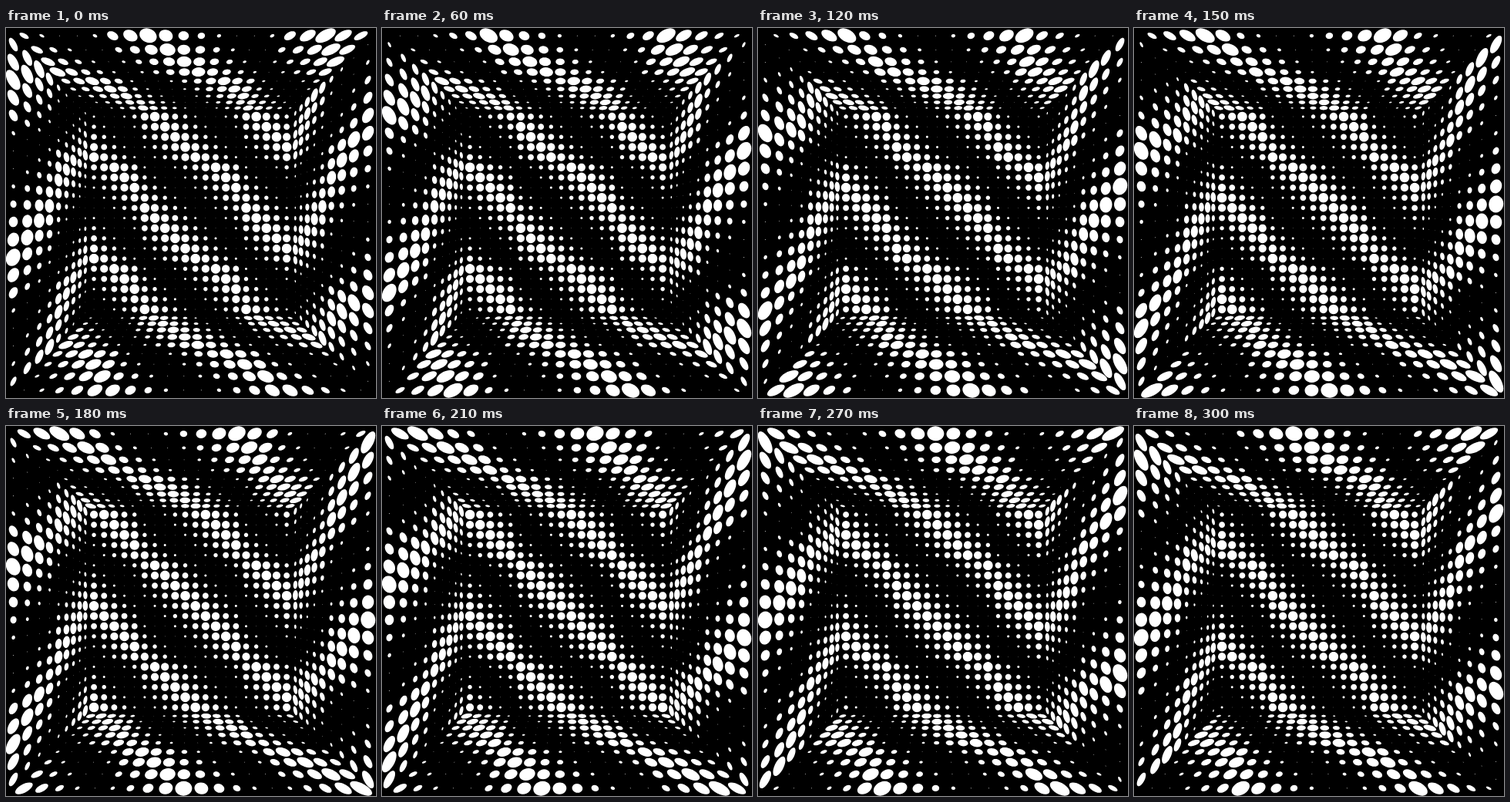
Animation of 480x480 px, one loop 0.33 s. Source, as an HTML page:

```html
<!DOCTYPE html>
<html lang="en">
<head>
<meta charset="utf-8">
<title>Halftone room</title>
<style>
  html, body { margin: 0; width: 100%; height: 100%; overflow: hidden; background: #000; }
  svg { display: block; width: 100vw; height: 100vh; }
</style>
</head>
<body>
<svg viewBox="0 0 480 480"><rect width="480" height="480"/><path id="dots" fill="#fff"/></svg>
<script>
const CX = 239.1, CY = 240, BACK = 13.16;
const CELLS = 20, DEPTH = 9;
const STEP = 30, STEPS = 11, PEAK = 7;
const SIDES = 24;
const path = document.getElementById('dots');

// Half width of the room at u cells in front of the back wall
const half = u => 1 / (0.00753 - 0.000374 * u);

// Horizontal centre, shifting slightly from the back wall to the front
const centre = (r, shift) => CX + shift * (r - 132) / 98;

// Each surface maps cell coordinates (a across, b down or outwards) to the stage
const back = (a, b) => [CX + (a - 10) * BACK, CY + (b - 10) * BACK];

const level = sign => (a, u) => {
  const r = half(u);
  return [centre(r, 2.8) + (a - 10) * r / 10, CY + sign * r];
};

const side = sign => (a, u) => {
  const r = half(u);
  return [centre(r, 0.4) + sign * r, CY + (a - 10) * r / 10];
};

// Delay in steps of a row or column: ten cells share one loop of eleven steps
const delay = n => n + Math.floor((n + 5) / 10);

const surfaces = [
  { map: back, rows: CELLS, wave: (k, j) => delay(k) - delay(j) },
  { map: level(-1), rows: DEPTH, wave: (k, d) => delay(k) - delay(-1 - d) },
  { map: level(1), rows: DEPTH, wave: (k, d) => delay(k) - delay(CELLS + d) },
  { map: side(-1), rows: DEPTH, wave: (j, d) => delay(d) - delay(j) },
  { map: side(1), rows: DEPTH, wave: (j, d) => delay(CELLS - 1 - d) - delay(j) }
];

function radius(phase) {
  const x = (phase - PEAK) / STEPS;
  const off = Math.abs(x - Math.round(x)) * STEPS;
  return 0.48 * (1 - off / 5.25);
}

function dot(map, a, b, r) {
  let d = '';
  for (let i = 0; i < SIDES; i++) {
    const t = 2 * Math.PI * i / SIDES;
    const [x, y] = map(a + r * Math.cos(t), b + r * Math.sin(t));
    d += (i ? 'L' : 'M') + x.toFixed(2) + ' ' + y.toFixed(2);
  }
  return d + 'Z';
}

function draw(step) {
  let d = '';
  for (const { map, rows, wave } of surfaces)
    for (let b = 0; b < rows; b++)
      for (let a = 0; a < CELLS; a++)
        d += dot(map, a + 0.5, b + 0.5, radius(wave(a, b) + step));
  path.setAttribute('d', d);
}

let shown = -1;
const start = performance.now();

function tick() {
  const step = Math.floor((performance.now() - start) / STEP) % STEPS;
  if (step !== shown) draw(shown = step);
  requestAnimationFrame(tick);
}
tick();
</script>
</body>
</html>
```
